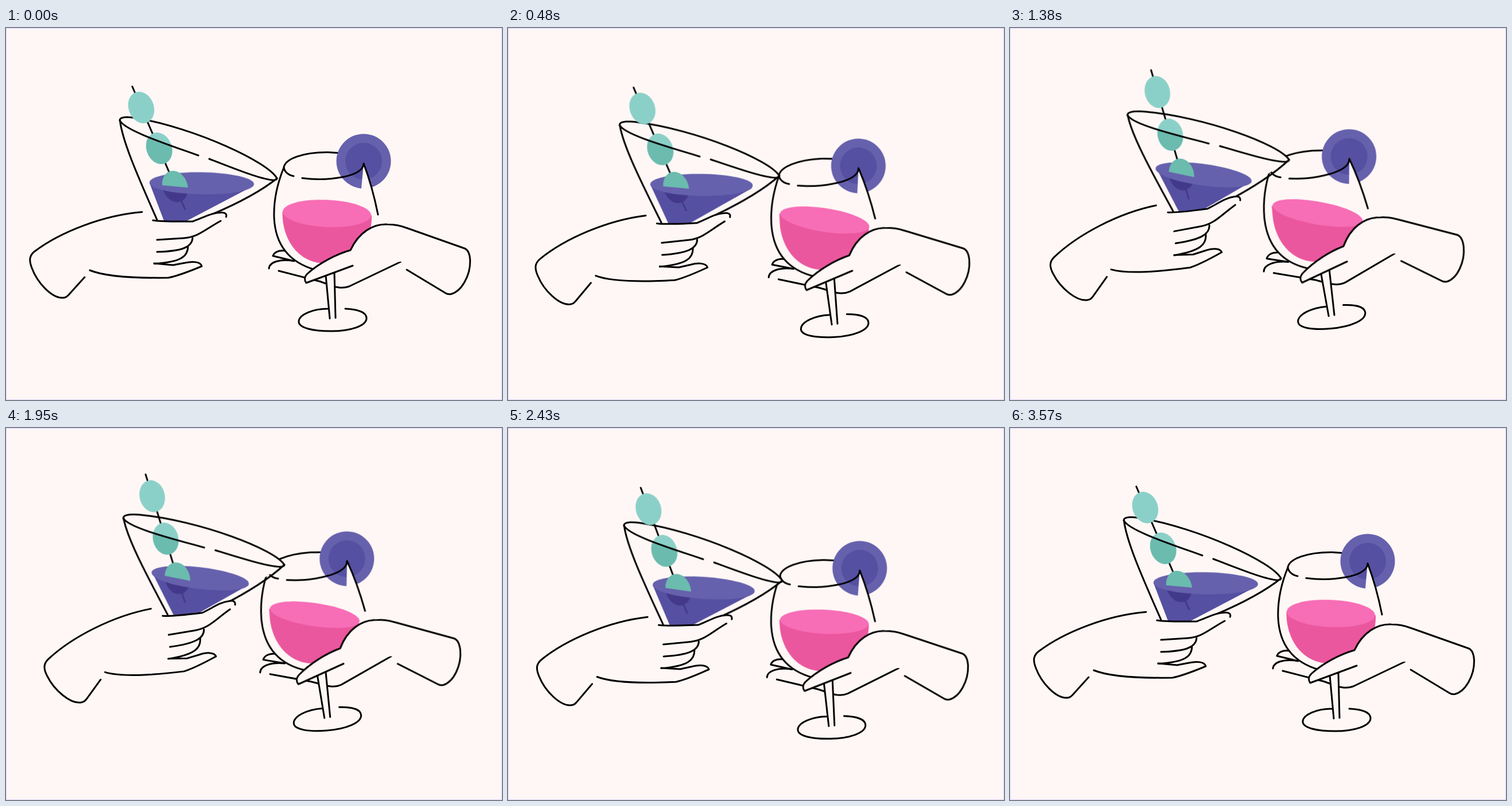
Recreate the animation shown at these times as an HTML page. Size 864 by 648 pixels, loop 4.5 s.

```html
<!DOCTYPE html>
<html lang="en">
<head>
<meta charset="utf-8">
<title>Cheers</title>
<style>
  html, body { margin: 0; width: 100%; height: 100%; overflow: hidden; background: #fff7f5; }
  svg { display: block; width: 100vw; height: 100vh; }

  .line { fill: none; stroke: #000; stroke-width: 3; stroke-linecap: round; stroke-linejoin: round; }
  .paper { fill: #fff7f5; }
  .plum { fill: #5550a1; }
  .lilac { fill: #6661ad; }
  .mint { fill: #8bd0c8; }
  .teal { fill: #6bbbae; }
  .deep { fill: #43398b; }
  .rose { fill: #eb579e; }
  .pink { fill: #f76db6; }

  .left, .right, .glass, .hand, .stick, .wave, .pool, .swirl {
    animation-duration: 4.5s;
    animation-iteration-count: infinite;
    animation-timing-function: linear;
  }
  .left { animation-name: left; }
  .right { animation-name: right, tilt; transform-origin: 574px 505px; }
  .glass { animation-name: tilt; transform-origin: 263px 334px; }
  .hand { animation-name: wrist; transform-origin: 265px 352px; }
  .stick { animation-name: stick; transform-origin: 294px 276px; }
  .wave { animation-name: wave; transform-origin: 341px 270.5px; }
  .pool { animation-name: pool; }
  .swirl { animation-name: swirl; transform-origin: 559px 323px; }

  @keyframes tilt {
    0% { rotate: 0deg; animation-timing-function: ease-in; }
    10.667% { rotate: -2.62deg; }
    12.444% { rotate: -3.3deg; animation-timing-function: ease-out; }
    16% { rotate: -4.43deg; animation-timing-function: ease-out; }
    24%, 36.667% { rotate: -4.87deg; animation-timing-function: ease-in; }
    49.333% { rotate: -2.77deg; animation-timing-function: ease-out; }
    60%, 100% { rotate: 0deg; }
  }
  @keyframes wrist {
    0% { rotate: 0deg; animation-timing-function: ease-in; }
    10.667% { rotate: -2.2deg; }
    12.444% { rotate: -3.1deg; animation-timing-function: ease-out; }
    16% { rotate: -5.1deg; animation-timing-function: ease-out; }
    30.667%, 36.667% { rotate: -6.8deg; animation-timing-function: ease-in; }
    49.333% { rotate: -4.6deg; animation-timing-function: ease-out; }
    60%, 100% { rotate: 0deg; }
  }
  @keyframes left {
    0% { translate: 0 0; animation-timing-function: cubic-bezier(.6, 0, .8, .6); }
    10.667% { translate: 4px 5px; animation-timing-function: ease-out; }
    12.444% { translate: 9px 9px; animation-timing-function: cubic-bezier(.4, 0, .6, 1); }
    16% { translate: 19px -9px; animation-timing-function: ease-out; }
    26%, 36.667% { translate: 21px -15px; animation-timing-function: ease-in; }
    49.333% { translate: 14px 3px; animation-timing-function: ease-out; }
    52.667% { translate: 8px 9px; animation-timing-function: cubic-bezier(.35, 0, .3, 1); }
    60%, 100% { translate: 0 0; }
  }
  @keyframes right {
    0% { translate: 0 0; animation-timing-function: cubic-bezier(.6, 0, .8, .6); }
    10.667% { translate: 0 10px; animation-timing-function: ease-out; }
    12.444% { translate: -3px 17px; animation-timing-function: cubic-bezier(.4, 0, .6, 1); }
    16% { translate: -9px -3px; animation-timing-function: ease-out; }
    22%, 36.667% { translate: -9px -5px; animation-timing-function: ease-in; }
    49.333% { translate: -10px 5px; animation-timing-function: ease-out; }
    52.667% { translate: -6px 15px; animation-timing-function: cubic-bezier(.35, 0, .3, 1); }
    60%, 100% { translate: 0 0; }
  }
  @keyframes stick {
    0% { transform: none; animation-timing-function: ease-in; }
    10.667% { transform: translate(-3px, -2px) rotate(2.75deg); }
    16% { transform: translate(-6px, -3px) rotate(5.8deg); animation-timing-function: ease-out; }
    30.667%, 36.667% { transform: translate(-11.4px, -4.5px) rotate(11.8deg); animation-timing-function: ease-in; }
    49.333% { transform: translate(-7px, -3.4px) rotate(7.4deg); animation-timing-function: ease-out; }
    62.667% { transform: translate(-1px, 0) rotate(.9deg); animation-timing-function: ease-in-out; }
    79.333%, 100% { transform: none; }
  }
  @keyframes wave {
    0% { transform: translate(0, 0) skewY(.9deg) scaleX(1); animation-timing-function: ease-in; }
    10.667% { transform: translate(-5px, 1px) skewY(3.2deg) scaleX(.98); }
    16% { transform: translate(-9px, 3px) skewY(6.3deg) scaleX(.955); animation-timing-function: ease-out; }
    30.667%, 36.667% { transform: translate(-19.5px, 5px) skewY(12deg) scaleX(.907); animation-timing-function: ease-in; }
    49.333% { transform: translate(-11.6px, 2.5px) skewY(7.4deg) scaleX(.95); animation-timing-function: ease-out; }
    62.667% { transform: translate(-.5px, .5px) skewY(1.9deg) scaleX(1); animation-timing-function: ease-in-out; }
    79.333%, 100% { transform: translate(0, 0) skewY(.9deg) scaleX(1); }
  }
  @keyframes pool {
    0% { d: path("M250 270L431 275L311 338L276 338Z"); animation-timing-function: ease-in; }
    10.667% { d: path("M247 267L424 281L311 338L276 338Z"); }
    16% { d: path("M245 264L417 287L311 338L276 338Z"); animation-timing-function: ease-out; }
    30.667%, 36.667% { d: path("M240.5 257L402 295L311 338L274 338Z"); animation-timing-function: ease-in; }
    49.333% { d: path("M243.5 262L414 289L311 338L275 338Z"); animation-timing-function: ease-out; }
    62.667% { d: path("M249.5 270L430 277L311 338L276 338Z"); animation-timing-function: ease-in-out; }
    79.333%, 100% { d: path("M250 270L431 275L311 338L276 338Z"); }
  }
  @keyframes swirl {
    0% { transform: translate(0, 0) skewY(2.3deg) scaleY(1.13); animation-timing-function: ease-in; }
    10.667% { transform: translate(1px, .5px) skewY(10.6deg) scaleY(1); }
    16% { transform: translate(1px, 1.5px) skewY(14deg) scaleY(1); animation-timing-function: ease-out; }
    30.667%, 36.667% { transform: translate(1px, 2.5px) skewY(14deg) scaleY(.98); animation-timing-function: ease-in; }
    49.333% { transform: translate(1.5px, 2px) skewY(7.3deg) scaleY(1); animation-timing-function: ease-out; }
    62.667% { transform: translate(0, 0) skewY(0deg) scaleY(1); animation-timing-function: ease-in-out; }
    79.333%, 100% { transform: translate(0, 0) skewY(2.3deg) scaleY(1.13); }
  }
</style>
</head>
<body>
<svg viewBox="0 0 864 648">
  <defs>
    <clipPath id="bowl"><path d="M481.500 290V322C481.500 372 512 410 556 410C605 410 637 375 637 330V290Z"/></clipPath>
    <clipPath id="inside"><path d="M335 222C285 204 205 178 198.500 161L240 340H345Z"/></clipPath>
    <ellipse id="olive" rx="22" ry="28.200" transform="rotate(-20)"/>
  </defs>
  <rect class="paper" width="864" height="648"/>

  <g class="right">
    <!-- fingers, stem and foot -->
    <path class="line" d="M485 388C474 387 467 391 465 397L502 406C478 402 459 407 458 419
      M475 423L545 441C565 447 580 457 598 450L688 407"/>
    <path class="paper" d="M557 428H572L574 506H564Z"/>
    <path class="line" d="M557 431L564 506M572 427L574 505
      M591 489C612 490 628 495 628 505.500C628 519 600 528 566 528C533 528 510 522 510 511.500C510 499 535 489 561 489"/>

    <!-- drink -->
    <g clip-path="url(#bowl)">
      <rect class="swirl rose" x="470" y="323" width="180" height="115"/>
    </g>
    <ellipse class="swirl pink" cx="559" cy="323" rx="77" ry="21"/>

    <!-- bowl and fruit slice -->
    <path class="line" d="M484 243C486 228 518 216 561 216.500L585 218"/>
    <circle class="lilac" cx="623" cy="232" r="47.500"/>
    <circle class="plum" cx="623" cy="232" r="32"/>
    <path class="paper" d="M623 236L618.700 282H638Z"/>
    <path class="line" d="M538 421C490 407 469 375 467 330C466 300 473 270 484 243C485 250 491 256 501 258
      M516 261.500C560 267 622 260 623 236C634 265 643 300 648 325"/>

    <!-- hand -->
    <path class="paper" d="M600 387C575 394 545 410 525 428C519 434 520 440 523 444L604 414L688 407L770 463
      L809 408L799 384L700 349C690 345 680 342 664 342C640 341 615 355 600 387Z"/>
    <path class="line" d="M604 414L523 444C520 440 519 434 525 428C545 410 575 394 600 387
      C615 355 640 341 664 342C680 342 690 345 700 349L799 384C806 387 808 395 808.500 405
      C809 432 793 459 775 463.500C771 464 769 464 766 462L698 421"/>
  </g>

  <g class="left">
    <g class="glass">
      <path class="paper" d="M198 161C198 154 212 154.500 228 157C330 174.500 458 234 472 262L358 325L300 345L263 334C235 270 203 200 198 161Z"/>
      <path class="line" d="M198 161C198 154 212 154.500 228 157C330 174.500 458 234 472 262"/>

      <!-- drink -->
      <path class="pool plum" d="M250 270L431 275L311 338L276 338Z"/>
      <g class="stick">
        <path class="deep" d="M272 274A21 27 -20 0 0 317 278Z"/>
        <path class="line" style="stroke:#43398b" d="M294 276L312 316"/>
      </g>
      <ellipse class="wave lilac" cx="341" cy="270.500" rx="91" ry="19.300"/>

      <!-- olives -->
      <g class="stick">
        <path class="line" d="M220 102L288 260"/>
        <use href="#olive" class="mint" transform="translate(235.500 138.500)"/>
        <use href="#olive" class="mint" transform="translate(266.800 209.500)"/>
        <path class="teal" d="M272 274A21 27 -20 0 1 317 278Z"/>
      </g>
      <g clip-path="url(#inside)">
        <g class="stick">
          <use href="#olive" class="teal" transform="translate(266.800 209.500)"/>
        </g>
      </g>

      <path class="line" d="M335 222C285 204 205 178 198.500 161C203 200 235 270 263 334
        M354 228C395 244 440 262 464 265C470 265 472 264 472 262C442 286 398 308 358 325"/>
    </g>

    <g class="hand">
      <path class="paper" d="M256 335C275 338 300 337 325 337C345 330 355 322 375 321L384 328L374 336L330 363L317 392L291 410L258 411Z"/>
      <path class="line" d="M237 320.500C170 326 95 355 50 389C41 396 39.500 404 45 418C55 445 80 470 98 470
        C104 470 106 468 109 465L137 434
        M146 422C170 432 220 436 283 435C303 431 324 422 341 415C339 407 325 406 312 409L291 413L258 410
        M256 335C275 338 300 337 325 337C345 330 357 322 374 321.500C382 321 385 324 383.500 329
        M263 369L310 366C335 364 345 352 374 336
        M325 366C324 381 308 389 263 390
        M317 380C317 398 305 408 258 410.500"/>
    </g>
  </g>

  <rect x=".5" y=".5" width="863" height="647" fill="none" stroke="#d9d3fb"/>
</svg>
</body>
</html>
```
